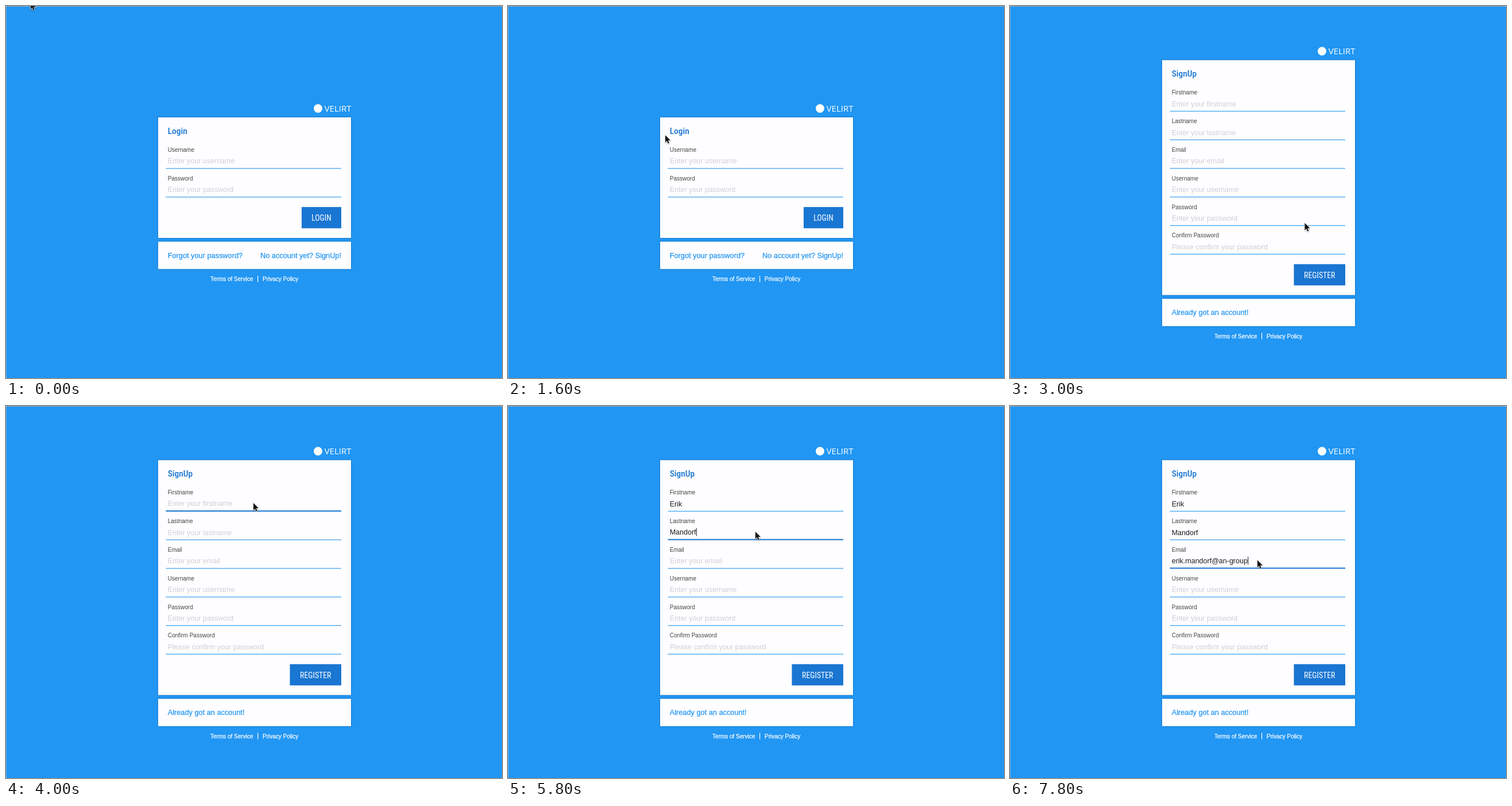
These frames come from a looping animation (864x648 px, 8 s). An HTML page:

```html
<!DOCTYPE html>
<html lang="en">
<head>
<meta charset="utf-8">
<title>Sign up</title>
<style>
  html, body { margin: 0; width: 100%; height: 100%; overflow: hidden; background: #2196f3; }
  svg { display: block; width: 864px; height: 648px; }
  text { font: 12.5px "Liberation Sans", Arial, sans-serif; white-space: pre; }
  .card { fill: #fefdff; filter: drop-shadow(0 .5px 1px rgba(0, 30, 80, .5)); }
  .title, .action { font-family: "Roboto Condensed", Roboto, sans-serif; font-stretch: 75%; }
  .title { font-size: 15.4px; font-weight: 500; fill: #1976d2; }
  .action { font-size: 13.8px; fill: #fff; text-anchor: middle; }
  .label { font-size: 10.05px; fill: #444; }
  .hint { fill: #d0ced3; }
  .value { fill: #1c1c1e; }
  .link { font-size: 12.75px; fill: #2196f3; stroke: #2196f3; stroke-width: .25px; }
  .hover { fill: #1976d2; stroke: none; text-decoration: underline; }
  .foot { font-size: 10px; fill: #fff; stroke: #fff; stroke-width: .25px; }
  .brand { font: 15px "Open Sans", sans-serif; fill: #fff; text-anchor: end; }
  .end { text-anchor: end; }
</style>
</head>
<body>
<svg viewBox="0 0 864 648">
  <rect width="864" height="648" fill="#2196f3"/>
  <path d="M.5 0V648" stroke="#6fb3ea"/>
  <path d="M0 .5H864" stroke="#9fabb5"/>
  <g id="page"></g>
  <path id="cursor" d="M0 0V12.4L2.8 9.8 4.7 14.4 6.7 13.5 4.8 9H8.9Z" fill="#111"
    stroke="#fff" stroke-width="1.2" paint-order="stroke" style="filter:drop-shadow(0 1px 1px rgba(0,0,0,.35))"/>
</svg>
<script>
const LOOP = 8000, STEP = 200, PITCH = 49.8;
const page = document.getElementById('page');
const cursor = document.getElementById('cursor');

const login = {
  top: 194, bottom: 404, title: 'Login', button: 'LOGIN', buttonX: 515,
  fields: [['Username', 'Enter your username'], ['Password', 'Enter your password']],
  links: ['Forgot your password?', 'No account yet? SignUp!']
};
const signup = {
  top: 94.3, bottom: 503.5, title: 'SignUp', button: 'REGISTER', buttonX: 494.5,
  fields: [
    ['Firstname', 'Enter your firstname'], ['Lastname', 'Enter your lastname'],
    ['Email', 'Enter your email'], ...login.fields, ['Confirm Password', 'Please confirm your password']
  ],
  links: ['Already got an account!']
};

// One entry per filled field: focus time, typing start and end
const entries = [
  { text: 'Erik', focus: 3800, from: 4000, to: 4600 },
  { text: 'Mandorf', focus: 5200, from: 5200, to: 5800 },
  { text: 'erik.mandorf@an-group', focus: 6200, from: 6250, to: 7800 }
];

// Pointer path: time, x, y
const path = [
  [800, 43, -7], [1000, 62, 12], [1200, 115, 66], [1400, 194, 147], [1600, 274, 225],
  [1800, 400, 335], [2000, 513.5, 431], [2800, 513.5, 431], [3000, 513.5, 378], [3200, 490, 280],
  [3400, 448, 198], [3600, 431, 169], [4600, 431, 169], [5000, 431, 219],
  [5800, 431, 219], [6000, 431, 268.5]
];

const text = (cls, x, y, s) => `<text class="${cls}" x="${x}" y="${y}">${s}</text>`;
const rect = (x, y, w, h, attrs) => `<rect x="${x}" y="${y}" width="${w}" height="${h}" ${attrs}/>`;

function pointer(t) {
  const i = path.findIndex(p => p[0] > t);
  if (i === 0) return path[0].slice(1);
  if (i < 0) return path.at(-1).slice(1);
  const [a, b] = [path[i - 1], path[i]], k = (t - a[0]) / (b[0] - a[0]);
  return [1, 2].map(j => a[j] + (b[j] - a[j]) * k);
}

function typed({ text, from, to }, t) {
  const k = Math.min(1, Math.max(0, (t - from) / (to - from)));
  return text.slice(0, Math.round(text.length * k));
}

function field([label, hint], y, value, focused) {
  const line = focused ? rect(278.5, y + 87.6, 305.5, 2, 'fill="#1976d2"')
                       : rect(278.5, y + 88.4, 305.5, 1.2, 'fill="#38a0f3"');
  return text('label', 281.7, y + 60, label) + line +
    text(value ? 'value' : 'hint', 281.7, y + (focused ? 79.6 : 80.4), value || hint);
}

function draw(t) {
  const form = t < 3000 ? login : signup;
  const { top, bottom, buttonX } = form;
  const active = form === signup ? entries.findLastIndex(e => t >= e.focus) : -1;
  const value = i => form === signup && entries[i] ? typed(entries[i], t) : '';
  const hover = t >= 2000 ? ' hover' : '';

  page.innerHTML =
    `<circle cx="543.5" cy="${top - 15.5}" r="7.5" fill="#fff"/>` +
    text('brand', 601.5, top - 10, 'VELIRT') +
    rect(265, top, 336, bottom - top, 'class="card"') +
    rect(265, bottom + 6.5, 336, 47.7, 'class="card"') +
    text('title', 281.7, top + 29, form.title) +
    form.fields.map((f, i) => field(f, top + i * PITCH, value(i), i === active)).join('') +
    rect(buttonX, bottom - 53.8, 584 - buttonX, 37, 'fill="#1976d2"') +
    text('action', (buttonX + 584) / 2, bottom - 30, form.button) +
    text('link', 281.7, bottom + 34.7, form.links[0]) +
    (form.links[1] ? text('link end' + hover, 584, bottom + 34.7, form.links[1]) : '') +
    text('foot', 356, bottom + 75.4, 'Terms of Service') +
    rect(438, bottom + 66, 1.2, 11, 'fill="#fff"') +
    text('foot', 447, bottom + 75.4, 'Privacy Policy');

  const entry = entries[active];
  if (entry && (t > entry.from && t <= entry.to || t % 1000 >= 500)) {
    const shown = page.querySelectorAll('.label ~ .value, .label ~ .hint')[active];
    const width = value(active) ? shown.getComputedTextLength() : 0;
    page.innerHTML += rect(282 + width, top + active * PITCH + 68.5, 1, 14, 'fill="#222"');
  }
  cursor.setAttribute('transform', `translate(${pointer(t)})`);
}

let last = -1;
function tick() {
  const t = Math.floor(performance.now() % LOOP / STEP) * STEP;
  if (t !== last) draw(last = t);
  requestAnimationFrame(tick);
}
tick();
</script>
</body>
</html>
```
